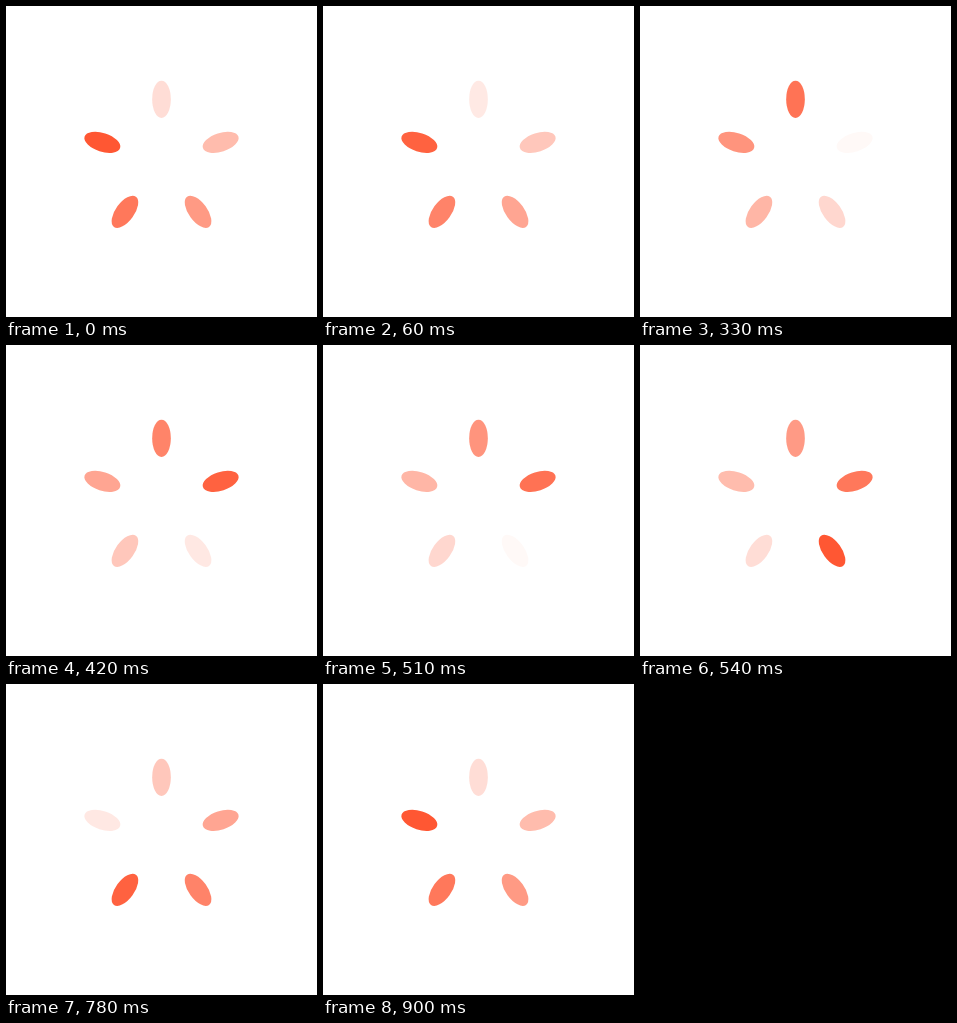
An HTML page that plays this animation: 311 by 311 pixels, repeating every 930 ms.

```html
<!DOCTYPE html>
<html lang="en">
<head>
<meta charset="utf-8">
<title>Spinner</title>
<style>
  html, body { margin: 0; width: 100%; height: 100%; overflow: hidden; background: #fff; }
  svg { display: block; width: 100vw; height: 100vh; }
</style>
</head>
<body>
<svg viewBox="0 0 100 100" fill="#ff5733">
  <ellipse cx="50" cy="30" rx="3" ry="6"/>
  <ellipse cx="50" cy="30" rx="3" ry="6" transform="rotate(72 50 50)"/>
  <ellipse cx="50" cy="30" rx="3" ry="6" transform="rotate(144 50 50)"/>
  <ellipse cx="50" cy="30" rx="3" ry="6" transform="rotate(216 50 50)"/>
  <ellipse cx="50" cy="30" rx="3" ry="6" transform="rotate(288 50 50)"/>
</svg>
<script>
  const LOOP = 930, FADE = 900;
  // Moments at which the picture steps; it holds in between.
  const steps = [0, 60, 150, 180, 240, 300, 330, 360, 420, 510, 540,
                 600, 660, 690, 720, 780, 840, 870, 900];
  const petals = [...document.querySelectorAll('ellipse')];
  const lag = FADE / petals.length;

  function draw(now) {
    const time = now % LOOP;
    const t = steps.findLast(s => s <= time);
    petals.forEach((petal, i) => {
      const age = (t + FADE - lag * (i + 1)) % FADE;
      petal.setAttribute('opacity', 1 - age / FADE);
    });
  }

  const start = performance.now();
  function tick() {
    draw(performance.now() - start);
    requestAnimationFrame(tick);
  }
  tick();
</script>
</body>
</html>
```
